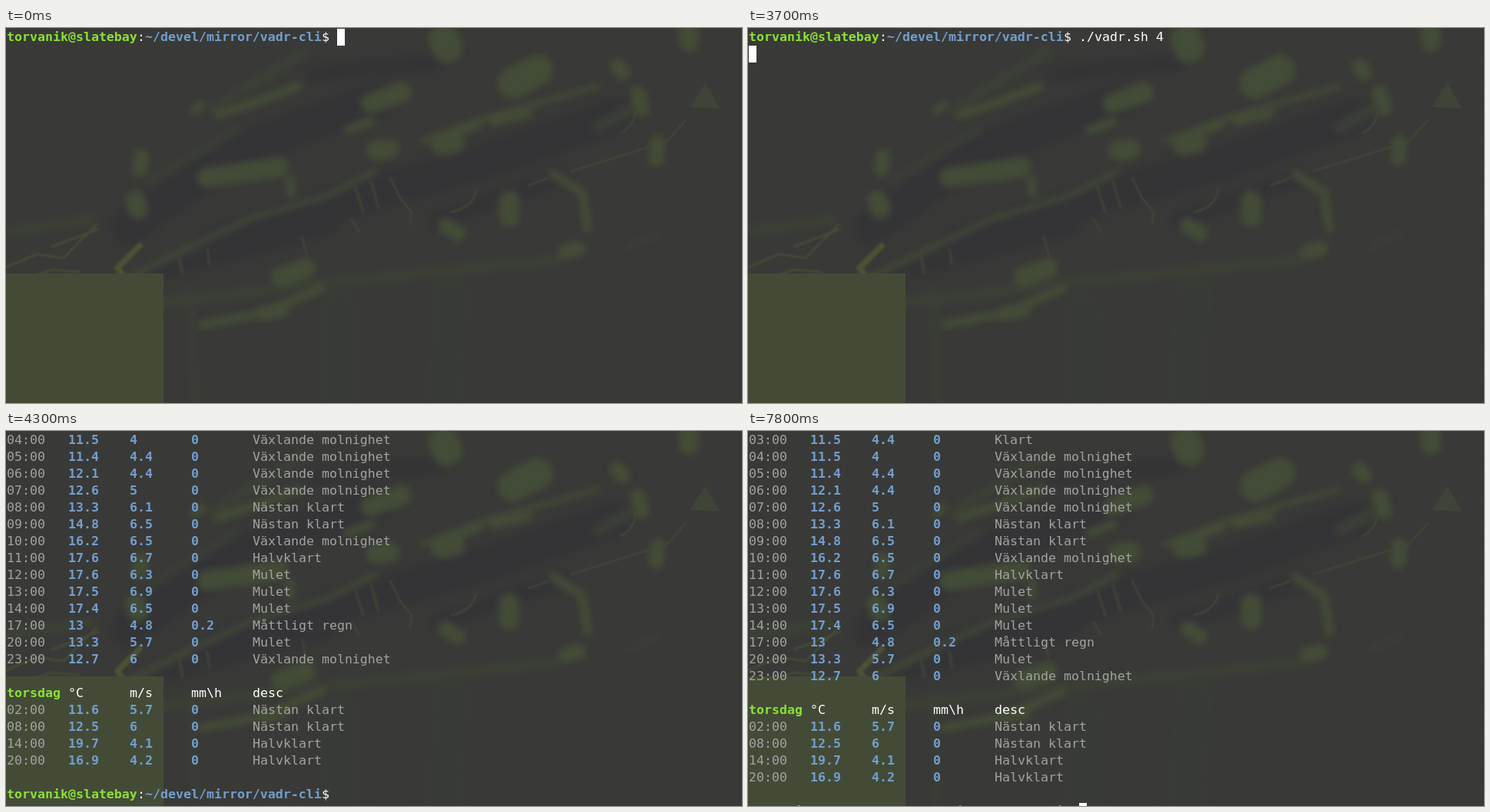
These frames come from a looping animation (958 by 489 pixels, 8 s). An HTML page with a canvas:

```html
<!DOCTYPE html>
<html lang="sv">
<head>
<meta charset="utf-8">
<title>Terminal forecast</title>
<style>
html, body { margin: 0; width: 100%; height: 100%; overflow: hidden; background: #393937; }
svg, canvas { position: absolute; left: 0; top: 0; }
path { fill: none; stroke-linecap: round; stroke-linejoin: round; }
.dark { stroke: #343437; filter: blur(7px); }
.haze { stroke: #3b4036; filter: blur(5px); }
.leaf { stroke: #434c37; filter: blur(4px); }
.edge { stroke: #444a37; filter: blur(1px); }
</style>
</head>
<body>
<svg width="958" height="489">
  <!-- soft backdrop -->
  <g class="dark">
    <path stroke-width="46" d="M160 260L300 160 480 95M270 285L480 215 620 175 790 115"/>
    <path stroke-width="22" d="M190 320L420 260M560 250L720 195M400 60L560 45"/>
  </g>
  <g class="haze">
    <path stroke-width="14" d="M270 105L390 30M0 265L110 250M190 360L440 330 720 302M770 130L815 105"/>
    <path stroke-width="60" opacity=".3" d="M435 370V489M580 350L570 489"/>
    <path stroke-width="8" d="M238 340L248 489M185 200L300 132M810 286L848 268"/>
  </g>
  <g class="leaf">
    <path stroke-width="40" d="M660 72L692 55M570 15L574 25"/>
    <path stroke-width="26" d="M262 195L355 182M475 98L515 84M482 160L498 158M566 152L584 150M655 225L655 246M888 2L889 18M168 225L172 236M358 325L390 314"/>
    <path stroke-width="20" d="M176 168L174 184M572 258L588 268M728 292L745 288M822 85L828 105M848 150L846 170M335 372L358 368M796 50L802 58"/>
    <path stroke-width="11" d="M245 108L255 100M275 113L325 97 380 76M445 133L475 122M585 137L615 126M635 122L680 112M370 198V216M712 190L750 215 757 262M255 387L330 373 410 340"/>
    <path stroke-width="6" d="M160 325L240 285 320 248 420 218 480 187M540 148L620 118 770 76"/>
  </g>
  <g class="edge">
    <path stroke-width="3" d="M0 312L40 295 75 300 118 256M15 330L60 315 95 318M60 285L120 262"/>
    <path stroke-width="2" d="M500 195L513 222 528 240 526 257M580 240Q608 234 612 212M680 205L705 196M735 187L860 148 885 120M820 110Q815 130 800 137M385 272L392 298"/>
    <path stroke-width="4" opacity=".6" d="M455 208L465 240M475 200L485 235M450 250L460 266M262 288L265 308M225 298L230 320"/>
    <path stroke-width="8" stroke="#4c5034" d="M174 284L145 313 157 329"/>
  </g>
  <path d="M890 103L910 72 930 105Z" style="fill:#3e4538"/>
  <rect y="320" width="205" height="205" fill="#434b37"/>
  <path d="M955.5 0V489" stroke="#323232" stroke-dasharray="4 4" style="stroke-linecap:butt"/>
</svg>
<canvas id="screen" width="958" height="489"></canvas>
<script>
const ctx = document.getElementById("screen").getContext("2d");
const CELL = 10, ROW = 22, ROWS = 22, LOOP = 8000;
const WHITE = "#ffffff", GREY = "#a3a4a1", GREEN = "#8ae234", BLUE = "#729fcf", YELLOW = "#fce94f";

const command = "./vadr.sh 4";
const keys = [[400, 1], [800, 2], [1000, 3], [1100, 4], [1300, 10], [1600, 11]];
const blinks = [4800, 5400, 6000, 6500, 7100];

const sky = {
  K: "Klart", N: "Nästan klart", H: "Halvklart",
  V: "Växlande molnighet", M: "Mulet", R: "Måttligt regn"
};

// name, hour of the i-th row, rows of "temperature wind sky"
const days = [
  ["måndag", i => 22 + i, "12.5 0.1 N,11.1 0.7 N"],
  ["tisdag", i => i,
    "10.5 1.2 N,9.6 2.2 K,9 2.3 K,8.8 2.5 K,8.6 2.6 K,8.4 3 K,9.2 3.2 K,10.3 3.3 K," +
    "12 3.8 K,13.6 4.2 K,16 4.2 K,18.5 5.8 K,19.3 5.9 K,20.1 6.1 K,20.9 6 K,21.3 5.7 K," +
    "21.7 5.4 K,22.1 5.7 K,21 5.9 K,19.7 6 K,18.6 5.7 K,17 4.9 K,15.2 3.3 K,13.6 3.9 K"],
  ["onsdag", i => i < 15 ? i : 3 * i - 28,
    "13 4.1 K,12.3 4.1 K,11.6 4.4 K,11.5 4.4 K,11.5 4 V,11.4 4.4 V,12.1 4.4 V,12.6 5 V," +
    "13.3 6.1 N,14.8 6.5 N,16.2 6.5 V,17.6 6.7 H,17.6 6.3 M,17.5 6.9 M,17.4 6.5 M," +
    "13 4.8 R,13.3 5.7 M,12.7 6 V"],
  ["torsdag", i => 2 + 6 * i, "11.6 5.7 N,12.5 6 N,19.7 4.1 H,16.9 4.2 H"]
];

// A line is a list of [column, text, colour, bold].
const prompt = [
  [0, "torvanik@slatebay", GREEN, true],
  [17, ":", WHITE],
  [18, "~/devel/mirror/vadr-cli", BLUE, true],
  [41, "$", WHITE]
];

const lines = [prompt];
for (const [name, hourOf, rows] of days) {
  lines.push([], [
    [0, name, GREEN, true], [8, "°C", WHITE], [16, "m/s", WHITE], [24, "mm\\h", WHITE], [32, "desc", WHITE]
  ]);
  rows.split(",").forEach((row, i) => {
    const [temp, wind, code] = row.split(" ");
    lines.push([
      [0, String(hourOf(i)).padStart(2, "0") + ":00", GREY],
      [8, temp, temp >= 20 ? YELLOW : BLUE, true],
      [16, wind, BLUE, true],
      [24, code === "R" ? "0.2" : "0", BLUE, true],
      [32, sky[code], GREY]
    ]);
  });
}
lines.push([], prompt);
const END = lines.length - 1;

function stateAt(t) {
  const typed = keys.reduce((n, [at, count]) => t >= at ? count : n, 0);
  if (t < 3700) return { typed, line: 0, col: 43 + typed, cursor: t < 2200 };
  if (t < 4300) {
    const step = Math.floor((t - 3700) / 100);
    return { typed, line: Math.max(1, 11 * step - 7), col: 0, cursor: true };
  }
  const cursor = blinks.filter(at => t >= at).length % 2 === 1;
  return { typed, line: END, col: 43, cursor };
}

function write(row, [col, text, color, bold]) {
  ctx.font = (bold ? "bold " : "") + '16.6px "DejaVu Sans Mono", monospace';
  ctx.fillStyle = color;
  ctx.fillText(text, 1 + col * CELL, 17 + row * ROW);
}

function render(t) {
  const { typed, line, col, cursor } = stateAt(t);
  const top = Math.max(0, line - ROWS + 1) - (t >= 7800 ? 1 : 0);
  const count = line === END ? END + 1 : Math.max(1, line);
  ctx.clearRect(0, 0, 958, 489);
  for (let i = top; i < count; i++) lines[i].forEach(part => write(i - top, part));
  if (top === 0) write(0, [43, command.slice(0, typed), WHITE]);
  if (cursor) {
    ctx.fillStyle = WHITE;
    ctx.fillRect(1 + col * CELL, 1 + (line - top) * ROW, CELL, ROW);
  }
}

const start = performance.now();
function frame() {
  render((performance.now() - start) % LOOP);
  requestAnimationFrame(frame);
}
frame();
</script>
</body>
</html>
```
